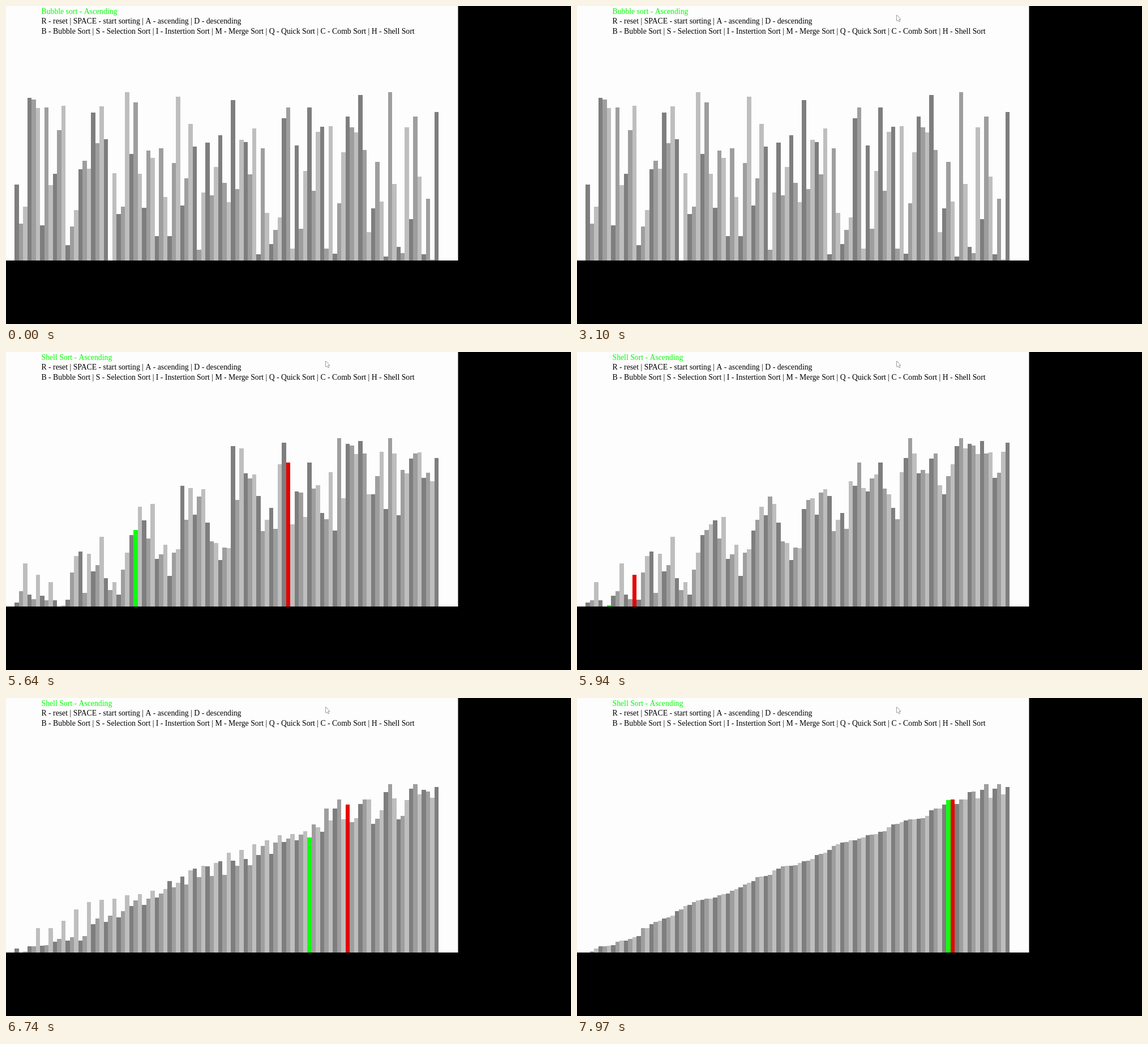
An HTML page with a canvas that plays this animation: 998x561 px, repeating every 8 s.

```html
<!DOCTYPE html>
<html lang="en">
<head>
<meta charset="utf-8">
<title>Sorting visualizer</title>
<style>
  html, body { margin: 0; width: 100%; height: 100%; overflow: hidden; background: #000; }
  canvas { display: block; }
</style>
</head>
<body>
<canvas id="stage" width="998" height="561"></canvas>
<script>
const ctx = document.getElementById('stage').getContext('2d');
const LOOP = 8000, CURSOR_AT = 2500, TITLE_AT = 3970, FLOOR = 449;
const GRAYS = ['#7e7e7e', '#9e9e9e', '#bebebe'];

// Top edge of each bar: the lower the number, the taller the bar.
const tops = [
  315, 384, 354, 162, 165, 180, 387, 179, 316, 296, 219, 176, 422, 389, 360, 288, 273, 287, 188, 242,
  177, 235, 449, 295, 367, 354, 152, 261, 170, 296, 356, 255, 268, 406, 251, 337, 406, 277, 160, 352,
  304, 208, 248, 430, 329, 241, 334, 284, 228, 312, 346, 166, 323, 236, 240, 297, 216, 438, 251, 365,
  420, 395, 373, 198, 179, 428, 246, 393, 291, 179, 326, 222, 213, 428, 212, 437, 348, 258, 195, 214,
  223, 157, 254, 399, 357, 275, 345, 442, 152, 314, 425, 436, 214, 376, 195, 301, 438, 340, 447, 187
];

// Shell sort, one step per swap.
function shellSteps(start) {
  const a = [...start], steps = [];
  for (let gap = a.length >> 1; gap > 0; gap >>= 1)
    for (let i = gap; i < a.length; i++)
      for (let j = i; j >= gap && a[j - gap] < a[j]; j -= gap) {
        [a[j], a[j - gap]] = [a[j - gap], a[j]];
        steps.push({ bars: [...a], gap, red: i, green: j - gap });
      }
  return steps;
}

const steps = shellSteps(tops);
const sorted = steps[steps.length - 1].bars;
const lastStep = (gap, i) =>
  steps.filter(s => s.gap > gap || (s.gap === gap && s.red <= i)).length - 1;

// Swaps run at a constant rate fixed by two moments of the sort.
const EARLY = { time: 5940, step: lastStep(6, 11) };
const LATE = { time: 6740, step: lastStep(3, 78) };
const stepAt = t => Math.floor(0.5 + EARLY.step +
  (t - EARLY.time) * (LATE.step - EARLY.step) / (LATE.time - EARLY.time));

function stateAt(t) {
  const n = stepAt(t);
  if (n < 0) return { bars: tops };
  return steps[n] || { bars: sorted };
}

const barX = i => Math.round(15.4 + 7.49 * i);

function drawBars({ bars, red, green }) {
  bars.forEach((top, i) => {
    ctx.fillStyle = i === green ? '#1f1' : i === red ? '#e60000' : GRAYS[i % 3];
    ctx.fillRect(barX(i), top, barX(i + 1) - barX(i), FLOOR - top);
  });
}

function drawText(text, y, color) {
  ctx.fillStyle = color;
  ctx.fillText(text, 62.5, y);
}

function drawCursor() {
  ctx.fillStyle = '#fff';
  ctx.strokeStyle = '#223';
  ctx.lineWidth = 0.9;
  ctx.stroke(cursor);
  ctx.fill(cursor);
}
const cursor = new Path2D('M565 16V26.2L567.3 24.2L568.9 27.6L570.3 27L568.8 23.6H571.6Z');

function draw(t) {
  ctx.fillStyle = '#000';
  ctx.fillRect(0, 0, 998, 561);
  ctx.fillStyle = '#fdfdfd';
  ctx.fillRect(0, 0, 798.5, FLOOR);
  drawBars(stateAt(t));
  ctx.font = '13.74px "Liberation Serif", serif';
  drawText((t < TITLE_AT ? 'Bubble sort' : 'Shell Sort') + ' - Ascending', 14, '#0f0');
  drawText('R - reset | SPACE - start sorting | A - ascending | D - descending', 31, '#000');
  drawText('B - Bubble Sort | S - Selection Sort | I - Instertion Sort | M - Merge Sort | ' +
    'Q - Quick Sort | C - Comb Sort | H - Shell Sort', 49, '#000');
  if (t >= CURSOR_AT) drawCursor();
}

const begin = performance.now();
function tick() {
  draw((performance.now() - begin) % LOOP);
  requestAnimationFrame(tick);
}
tick();
</script>
</body>
</html>
```
